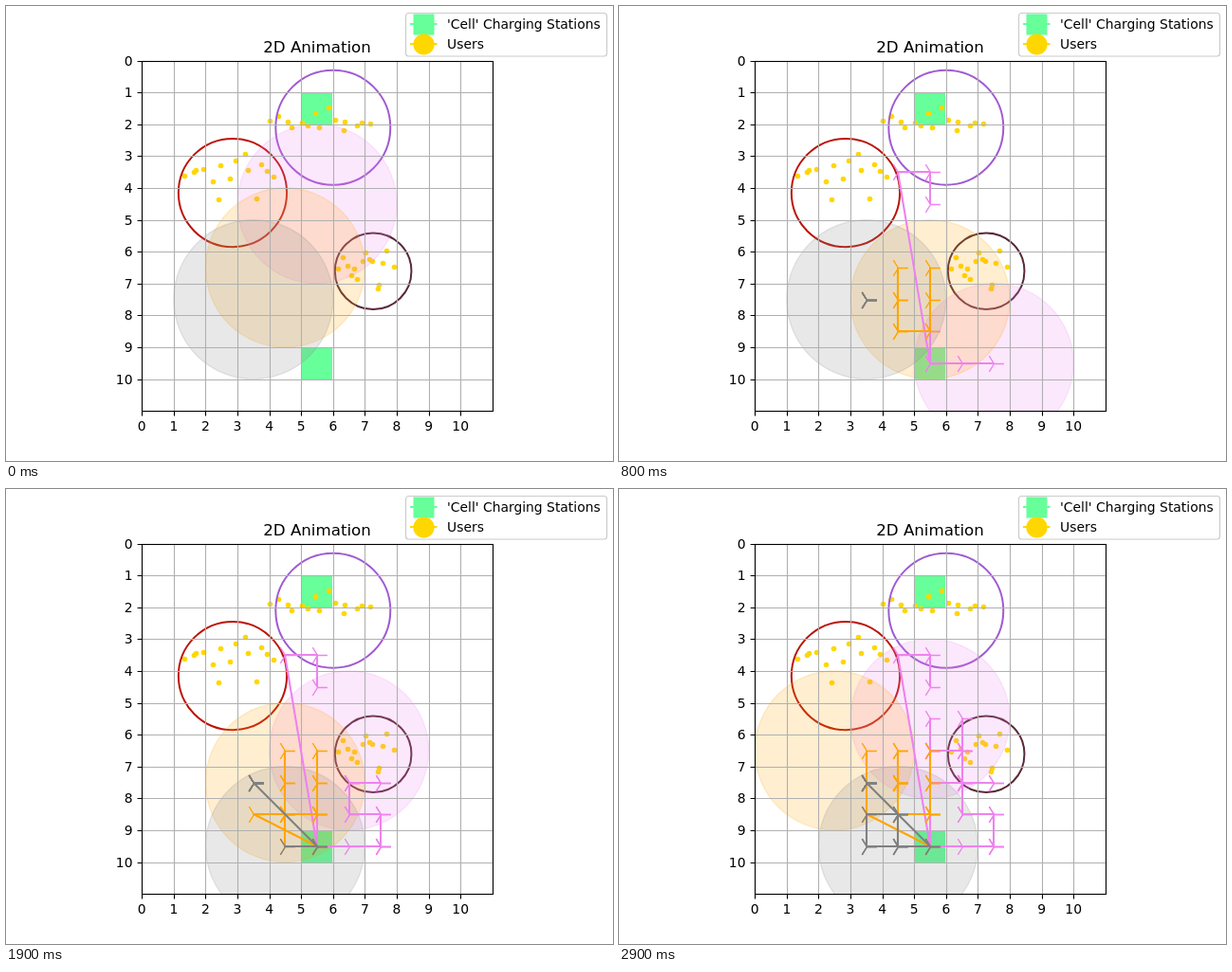
An HTML page for the animation above (3 s loop, 640x480 px).

```html
<!DOCTYPE html>
<html lang="en">
<head>
<meta charset="utf-8">
<title>2D Animation</title>
<style>
  html, body { margin: 0; width: 100%; height: 100%; overflow: hidden; background: #fff; }
  svg { display: block; width: 640px; height: 480px; }
  text { font: 13.89px "DejaVu Sans", sans-serif; fill: #000; }
  .title { font-size: 16.67px; }
  .mid { text-anchor: middle; }
  .end { text-anchor: end; }
</style>
</head>
<body>
<svg viewBox="0 0 640 480">
  <defs>
    <clipPath id="plot"><rect x="143.2" y="57.6" width="369.6" height="369.6"/></clipPath>
  </defs>
  <g clip-path="url(#plot)">
    <g fill="#66ff99">
      <rect x="311" y="91" width="33" height="34"/>
      <rect x="311" y="360" width="33" height="34"/>
    </g>
    <g id="users" fill="#ffd700"></g>
    <g id="rings" fill="none" stroke-width="2"></g>
    <g id="discs" stroke-width="1.39"></g>
    <g id="grid" stroke="#b0b0b0" stroke-width="1.11"></g>
    <g id="trails" fill="none"></g>
  </g>
  <rect x="143.5" y="58.5" width="370" height="369" fill="none" stroke="#000" stroke-width="1.11"/>
  <g id="ticks" stroke="#000" stroke-width="1.11"></g>
  <g id="labels"></g>
  <text class="title mid" x="328" y="49">2D Animation</text>
  <rect x="421.5" y="7.5" width="212" height="45.5" rx="3" fill="#fff" stroke="#ccc" stroke-width="1.2"/>
  <path d="M426 19H454.500" stroke="#66ff99" stroke-width="2"/>
  <rect x="429.5" y="8.5" width="22" height="22" fill="#66ff99"/>
  <path d="M426 40H454.500" stroke="#ffd700" stroke-width="2"/>
  <circle cx="440.500" cy="40.500" r="11.1" fill="#ffd700"/>
  <text x="465" y="23.5">'Cell' Charging Stations</text>
  <text x="465" y="44.5">Users</text>
</svg>
<script>
const UNIT = 33.6, STEP = 100, STEPS = 30;
const px = u => 143.2 + UNIT * u;
const py = v => 57.6 + UNIT * v;
const crisp = n => Math.round(n) + 0.5;

function add(parent, tag, attrs, text) {
  const el = document.createElementNS('http://www.w3.org/2000/svg', tag);
  for (const k in attrs) el.setAttribute(k, attrs[k]);
  if (text !== undefined) el.textContent = text;
  (typeof parent === 'string' ? document.getElementById(parent) : parent).append(el);
  return el;
}

// Axes
for (let i = 0; i <= 10; i++) {
  const x = crisp(px(i)), y = crisp(py(i));
  add('grid', 'path', { d: `M${x} 58V427M143 ${y}H513` });
  add('ticks', 'path', { d: `M${x} 427.5v4.9M143.5 ${y}h-4.9` });
  add('labels', 'text', { class: 'mid', x: px(i), y: 448 }, i);
  add('labels', 'text', { class: 'end', x: 133.5, y: Math.round(py(i) + 5) }, i);
}

// Users scattered over an ellipse, spread evenly from left to right
let seed = 7;
const random = () => (seed = seed * 16807 % 2147483647) / 2147483647;

function scatter(cx, cy, rx, ry, count = 15) {
  for (let i = 0; i < count; i++) {
    const t = 2 * (i + random()) / count - 1;
    const s = (2 * random() - 1) * Math.sqrt(1 - t * t);
    add('users', 'circle', { cx: crisp(px(cx + rx * t)), cy: crisp(py(cy + ry * s)), r: 2.8 });
  }
}

function ring(x, y, r, stroke) {
  add('rings', 'circle', { cx: px(x), cy: py(y), r: r * UNIT, stroke });
}

scatter(5.6, 1.9, 1.6, 0.5);
ring(6, 2.1, 1.8, '#a05ad2');
scatter(2.75, 3.7, 1.5, 0.9);
ring(2.85, 4.15, 1.7, '#bb1408');
scatter(7, 6.5, 0.9, 0.95);
ring(7.26, 6.61, 1.2, '#5a2a36');

// Moves per step: up, down, left, right, "." wait, "h" home to the charger
const HOME = [5.5, 9.5];
const MOVES = { u: [0, -1], d: [0, 1], l: [-1, 0], r: [1, 0], '.': [0, 0] };

function walk(start, moves) {
  const path = [start];
  for (const m of moves) {
    const [x, y] = path[path.length - 1];
    path.push(m === 'h' ? HOME : [x + MOVES[m][0], y + MOVES[m][1]]);
  }
  return path.map(([x, y]) => [px(x), py(y)]);
}

function drone(color, start, moves) {
  const path = walk(start, moves);
  const disc = add('discs', 'circle', {
    r: 2.5 * UNIT, fill: color, stroke: color, 'fill-opacity': 0.185, 'stroke-opacity': 0.185
  });
  const g = add('trails', 'g', { stroke: color });
  const line = add(g, 'polyline', { 'stroke-width': 2.08, 'stroke-linejoin': 'round' });
  const marks = path.map(([x, y]) => add(g, 'path', {
    d: `M${crisp(x)} ${crisp(y)}h10.4m-10.4 0l-5.2 -8.3m5.2 8.3l-5.2 8.3`,
    'stroke-width': 1.39
  }));
  return { path, disc, line, marks };
}

const drones = [
  drone('violet', [5.5, 4.5], 'ulhudrr.udulur.lduuuddluudrlu'),
  drone('orange', [4.5, 6.5], 'ddudruuddlrllh..luu.duuddluul'),
  drone('gray', [3.5, 7.5], '.'.repeat(13) + 'h..lrl.udl..ur.d')
];

function show(step) {
  for (const { path, disc, line, marks } of drones) {
    const [x, y] = path[step];
    disc.setAttribute('cx', x);
    disc.setAttribute('cy', y);
    line.setAttribute('points', path.slice(0, step).map(p => p.map(Math.round).join()).join(' '));
    marks.forEach((m, i) => m.setAttribute('visibility', i < step ? 'visible' : 'hidden'));
  }
}

let last = -1;
const start = performance.now();
function tick() {
  const step = Math.floor(Math.max(0, performance.now() - start) / STEP) % STEPS;
  if (step !== last) show(last = step);
  requestAnimationFrame(tick);
}
tick();
</script>
</body>
</html>
```
